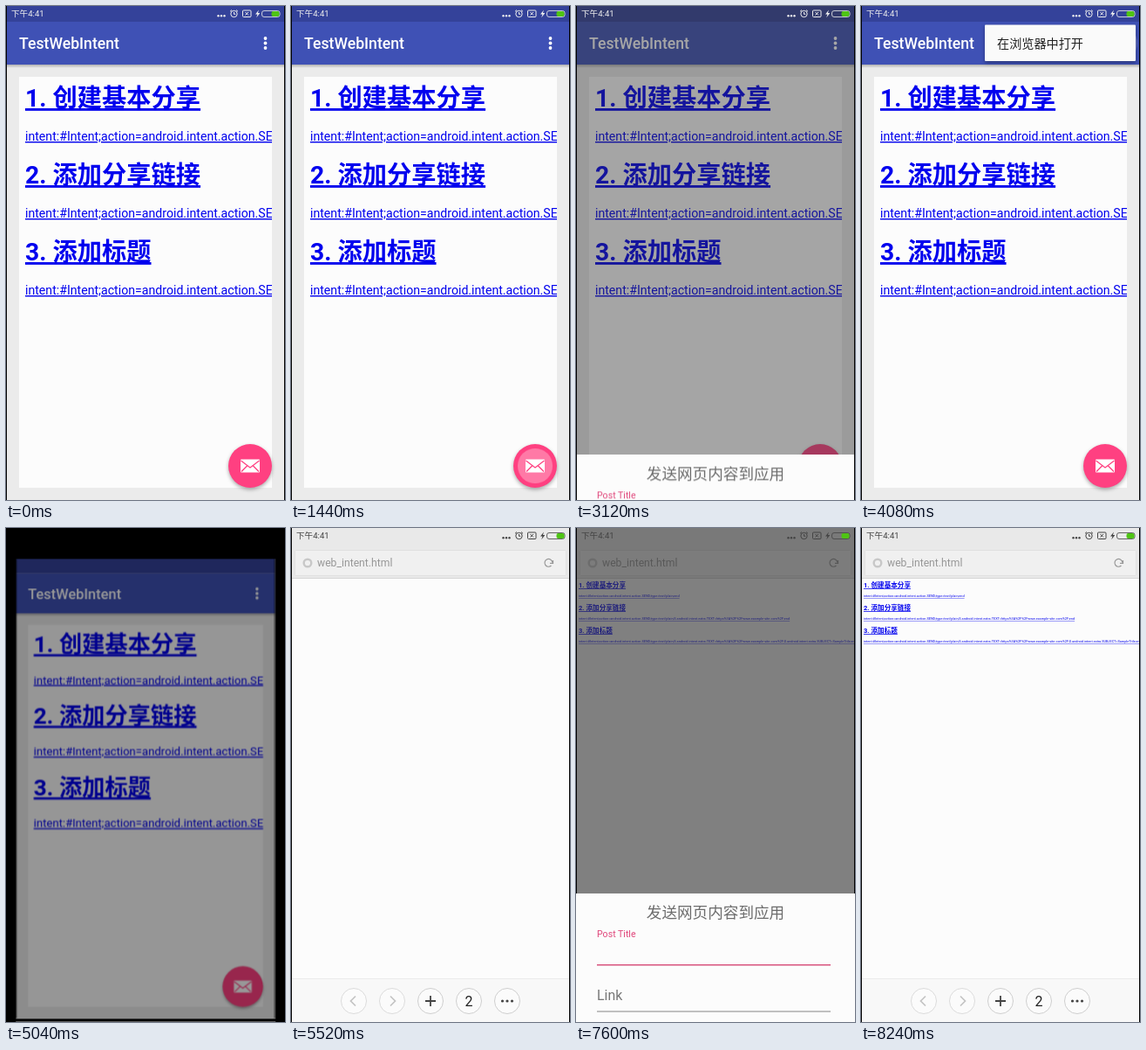
Animation of 320 by 565 pixels, one loop 8320 ms. Source, as an HTML page:

```html
<!DOCTYPE html>
<html lang="zh-CN">
<head>
<meta charset="utf-8">
<title>Web intent demo</title>
<style>
html, body { margin: 0; width: 100%; height: 100%; overflow: hidden; background: #000; }
svg { display: block; width: 320px; height: 565px; font-family: Roboto, "Noto Sans CJK SC", "Noto Sans CJK", sans-serif; }
.line { fill: none; stroke: currentColor; }
.web { fill: #00e; text-decoration: underline; text-decoration-skip-ink: none; }
.h { font-weight: 700; }
.big { font-size: 14.13px; }
.big text { text-decoration: underline 1px; text-underline-offset: 2px; text-decoration-skip-ink: none; }
.big .h { font-size: 28.27px; }
.small { font-size: 3.83px; }
.small .h { font-size: 7.6px; }
.raised { filter: drop-shadow(0 2px 2px #0005); }
.scrim { fill: #303030; }

/* One loop lasts 8320 ms, so 1% is 83.2 ms. */
.anim { animation: 8320ms linear infinite both; }
#app { transform-origin: 160px 282.5px; animation-name: sink; }
#ripple { transform-origin: 280px 526px; animation-name: ripple; }
#dim { animation-name: dim; }
#slide { animation-name: slide; }
#cursor { animation-name: cursor; animation-timing-function: step-end; }
#dotRipple { animation-name: dotRipple; }
#popup { transform-origin: 315px 22px; animation-name: popup; }
#itemRipple { animation-name: itemRipple; }
#browser { animation-name: browser; }
#page { animation-name: page; animation-timing-function: step-end; }
#press { animation-name: press; animation-timing-function: step-end; }
#window { animation-name: window; }
#windowSheet { animation-name: windowSheet; }
#status { animation-name: status; animation-timing-function: step-end; }

@keyframes ripple {
  0%, 16% { opacity: 0; transform: scale(.3); }
  17.3% { opacity: .3; transform: scale(.8); }
  18.3% { opacity: .25; transform: scale(1); }
  21%, 100% { opacity: 0; transform: scale(1); }
}
@keyframes dim {
  0%, 17.8% { opacity: 0; }
  20.8%, 36.5% { opacity: .6; }
  40%, 100% { opacity: 0; }
}
@keyframes slide {
  0%, 17.8% { transform: translateY(152px); animation-timing-function: cubic-bezier(.2, .6, .3, 1); }
  22.6%, 34.4% { transform: none; animation-timing-function: cubic-bezier(.4, 0, .8, .7); }
  38.5%, 100% { transform: translateY(152px); }
}
@keyframes cursor {
  0% { opacity: 0; }
  27.88% { opacity: 1; }
  32.69%, 100% { opacity: 0; }
}
@keyframes dotRipple {
  0%, 45% { opacity: 0; }
  46.2%, 47.5% { opacity: .25; }
  51.9%, 100% { opacity: 0; }
}
@keyframes popup {
  0%, 46.1% { opacity: 0; transform: scale(.3, .2); animation-timing-function: ease-out; }
  48.9%, 55% { opacity: 1; transform: none; }
  56.73%, 100% { opacity: 0; transform: none; }
}
@keyframes itemRipple {
  0%, 53.6% { opacity: 0; }
  54.8%, 56% { opacity: .12; }
  57%, 100% { opacity: 0; }
}
@keyframes sink {
  0%, 58.4% { opacity: 1; transform: none; }
  60.58% { opacity: .6; transform: translateY(15.5px) scale(.93); }
  62.1%, 100% { opacity: .55; transform: translateY(20px) scale(.91); }
}
@keyframes browser {
  0%, 60.82% { transform: translateY(621px); animation-timing-function: cubic-bezier(.22, 1, .36, 1); }
  66.2%, 100% { transform: none; }
}
@keyframes page {
  0% { opacity: 0; }
  69.23%, 100% { opacity: 1; }
}
@keyframes press {
  0% { opacity: 0; }
  71.15% { opacity: .35; }
  75.96%, 100% { opacity: 0; }
}
@keyframes window {
  0%, 81.41% { transform: translateY(621px); animation-timing-function: cubic-bezier(.22, 1, .36, 1); }
  87.42%, 93.8% { transform: none; animation-timing-function: cubic-bezier(.4, 0, .8, .6); }
  98.8%, 100% { transform: translateY(621px); }
}
@keyframes windowSheet {
  0%, 91.1% { transform: none; animation-timing-function: cubic-bezier(.4, 0, .8, .7); }
  94.2%, 100% { transform: translateY(152px); }
}
@keyframes status {
  0% { opacity: 1; color: #eee; }
  58.6% { opacity: 0; color: #444; }
  63%, 100% { opacity: 1; color: #444; }
}
</style>
</head>
<body>
<svg viewBox="0 0 320 565">
  <defs>
    <clipPath id="view"><rect x="15" y="81" width="290" height="470"/></clipPath>
    <linearGradient id="shade" x2="0" y2="1">
      <stop stop-color="#000" stop-opacity=".25"/>
      <stop offset="1" stop-color="#000" stop-opacity="0"/>
    </linearGradient>
    <g id="sheet">
      <rect y="417" width="320" height="150" fill="#fcfcfc"/>
      <text x="160" y="444.5" font-size="17.6" text-anchor="middle" fill="#6c6c6c">发送网页内容到应用</text>
      <text x="24" y="466.5" font-size="10.6" fill="#e0487c">Post Title</text>
      <path d="M24 498.200H292" stroke="#d8557f" stroke-width="1.600"/>
      <text x="24" y="539" font-size="15.9" fill="#777">Link</text>
      <path d="M24 551.5H292" stroke="#858585"/>
    </g>
  </defs>

  <g id="app" class="anim">
    <rect width="320" height="565" fill="#ebebeb"/>
    <rect width="320" height="18" fill="#34429a"/>
    <rect y="18" width="320" height="49" fill="#3f51b5"/>
    <rect y="67" width="320" height="4" fill="url(#shade)"/>
    <text x="15" y="49" font-size="17.67" font-weight="500" fill="#fff">TestWebIntent</text>
    <g fill="#fff">
      <circle id="dotRipple" class="anim" cx="297" cy="42.5" r="20"/>
      <circle cx="297.5" cy="37" r="1.9"/>
      <circle cx="297.5" cy="42.5" r="1.9"/>
      <circle cx="297.5" cy="48" r="1.9"/>
    </g>
    <rect x="15" y="81" width="290" height="470" fill="#fcfcfc"/>
    <g class="web big" style="text-decoration: none" clip-path="url(#view)">
      <text class="h" x="22" y="115">1. 创建基本分享</text>
      <text x="22" y="154">intent:#Intent;action=android.intent.action.SEND;type=text/plain;end</text>
      <text class="h" x="22" y="203">2. 添加分享链接</text>
      <text x="22" y="242">intent:#Intent;action=android.intent.action.SEND;type=text/plain;end</text>
      <text class="h" x="22" y="291">3. 添加标题</text>
      <text x="22" y="330">intent:#Intent;action=android.intent.action.SEND;type=text/plain;end</text>
    </g>
    <circle class="raised" cx="280" cy="526" r="25" fill="#ff4081"/>
    <circle id="ripple" class="anim" cx="280" cy="526" r="25" fill="#fff"/>
    <rect x="269" y="518.5" width="22" height="15" rx="1" fill="#fff"/>
    <path d="M269.5 520L280 528L290.5 520M270 532.5L276.5 526M290 532.5L283.5 526" fill="none" stroke="#ff4081" stroke-width="1.3"/>

    <g id="popup" class="anim">
      <rect class="raised" x="142" y="21.5" width="173" height="41.5" rx="1" fill="#fafafa"/>
      <rect id="itemRipple" class="anim" x="142" y="21.5" width="173" height="41.5"/>
      <text x="156" y="47.5" font-size="14.13" fill="#222">在浏览器中打开</text>
    </g>

    <rect id="dim" class="anim scrim" width="320" height="565"/>
    <g id="slide" class="anim">
      <use href="#sheet"/>
      <path id="cursor" class="anim" d="M24.8 474V492" stroke="#e0487c" stroke-width="1.5"/>
    </g>
    <path d="M.5 0V565M319.5 0V565" stroke="#000"/>
  </g>

  <g id="browser" class="anim">
    <rect width="320" height="565" fill="#fcfcfc"/>
    <rect width="320" height="57" fill="#e9e9e9"/>
    <rect x="4.5" y="25.5" width="311" height="29" rx="1" fill="#f0f0f0" stroke="#e0e0e0"/>
    <path d="M0 57.5H320" stroke="#d6d6d6"/>
    <circle cx="19" cy="40" r="4.3" fill="none" stroke="#c8c8c8" stroke-width="2.4"/>
    <text x="30" y="44.3" font-size="12.2" fill="#979797">web_intent.html</text>
    <path d="M298.5 43A4.4 4.4 0 1 1 299.8 39.5M300.5 37V40.3H297" fill="none" stroke="#999" stroke-width="1.2"/>

    <g id="page" class="anim web small">
      <text class="h" x="3" y="68">1. 创建基本分享</text>
      <text x="3" y="79.3">intent:#Intent;action=android.intent.action.SEND;type=text/plain;end</text>
      <text class="h" x="3" y="94">2. 添加分享链接</text>
      <text x="3" y="105.3">intent:#Intent;action=android.intent.action.SEND;type=text/plain;S.android.intent.extra.TEXT=https%3A%2F%2Fwww.example-site.com%2F;end</text>
      <text class="h" x="3" y="120">3. 添加标题</text>
      <text x="3" y="131.3">intent:#Intent;action=android.intent.action.SEND;type=text/plain;S.android.intent.extra.TEXT=https%3A%2F%2Fwww.example-site.com%2F;S.android.intent.extra.SUBJECT=SampleTitle;end</text>
    </g>
    <rect id="press" class="anim" x="2" y="100" width="244" height="8" fill="#33b5e5"/>

    <rect y="515" width="320" height="50" fill="#f8f8f8"/>
    <path d="M0 515.5H320" stroke="#ececec"/>
    <g fill="#fbfbfb" stroke="#cfcfcf">
      <circle cx="72" cy="541" r="14.5" stroke="#dcdcdc"/>
      <circle cx="116" cy="541" r="14.5" stroke="#dcdcdc"/>
      <circle cx="160" cy="541" r="14.5"/>
      <circle cx="204" cy="541" r="14.5"/>
      <circle cx="248" cy="541" r="14.5"/>
    </g>
    <path d="M74 535.5L68.5 541L74 546.5M114 535.5L119.5 541L114 546.5" fill="none" stroke="#c4c4c4" stroke-width="1.7"/>
    <path d="M154 541H166M160 535V547" stroke="#444" stroke-width="1.8"/>
    <text x="204" y="546.5" font-size="16" text-anchor="middle" fill="#222">2</text>
    <g fill="#444">
      <circle cx="242.5" cy="541" r="1.6"/>
      <circle cx="248" cy="541" r="1.6"/>
      <circle cx="253.5" cy="541" r="1.6"/>
    </g>
    <path d="M.5 0V565M319.5 0V565" stroke="#000"/>
  </g>

  <g id="window" class="anim">
    <rect class="scrim" x="1" width="318" height="565" fill-opacity=".6"/>
    <g id="windowSheet" class="anim"><use href="#sheet"/></g>
  </g>

  <g id="status" class="anim" fill="currentColor">
    <text x="6" y="12.3" font-size="9.6">下午4:41</text>
    <circle cx="243.5" cy="11.3" r="1.2"/>
    <circle cx="247" cy="11.3" r="1.2"/>
    <circle cx="250.5" cy="11.3" r="1.2"/>
    <g class="line">
      <circle cx="261.5" cy="9" r="3.7"/>
      <path d="M261.5 7V9.3H263.3M257 6.3L259 4.5M266 6.3L264 4.5"/>
      <rect x="271.5" y="5" width="9.5" height="7.5" rx="1"/>
      <path d="M274.5 7L278 10.5M278 7L274.5 10.5"/>
      <rect x="293.5" y="5.5" width="20.5" height="7" rx="2.5" stroke-width=".8"/>
    </g>
    <path d="M290 4.5L286 9.6H288.4L287.3 13.2L291.3 8H288.9Z"/>
    <rect x="304.5" y="6" width="9" height="6" rx="2" fill="#4fc414"/>
  </g>
</svg>
</body>
</html>
```
